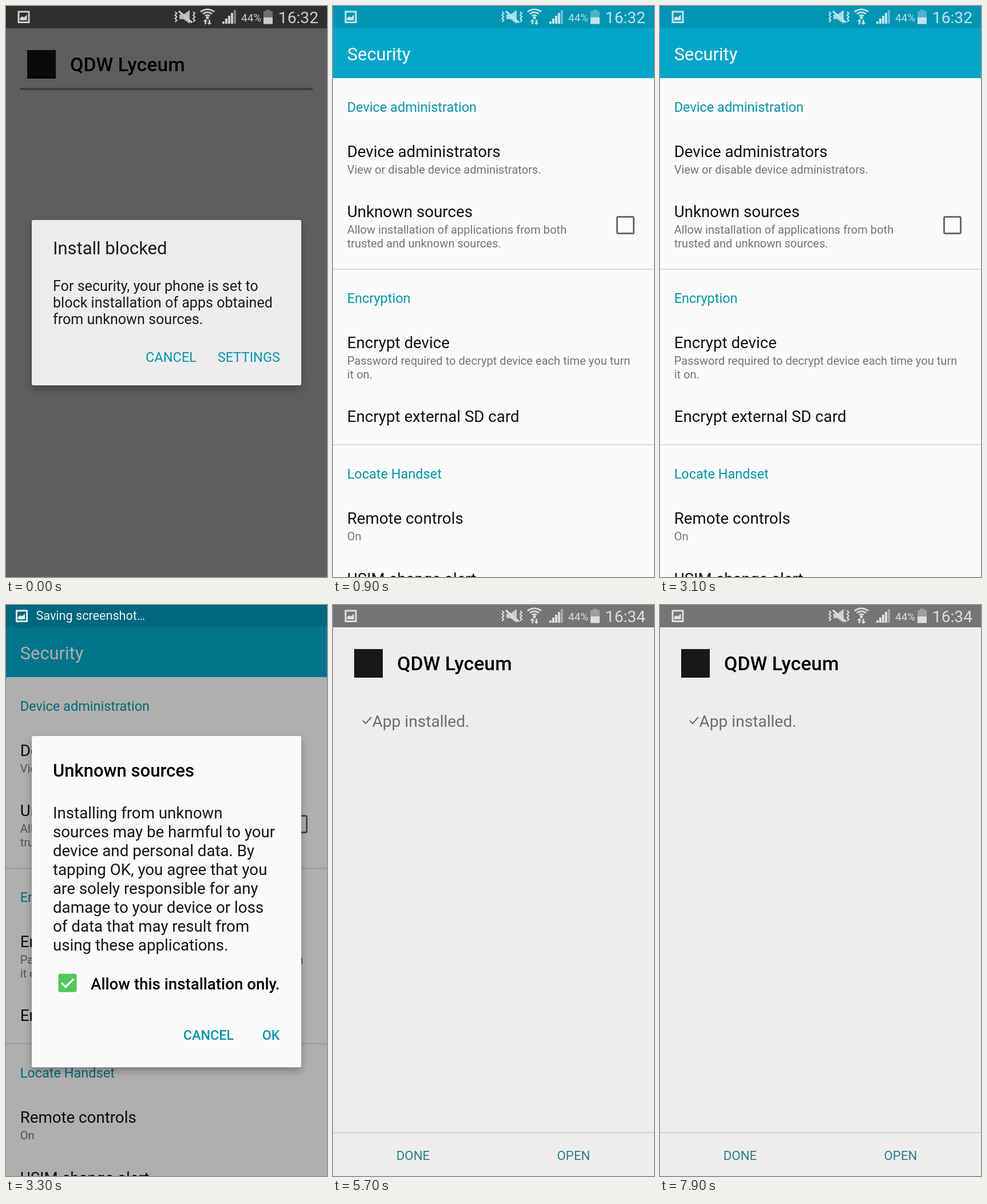
Animation, 561 px wide and 998 px high, one loop 8 s. Source, as an HTML page:

```html
<!DOCTYPE html>
<html lang="en">
<head>
<meta charset="utf-8">
<title>Allowing an app installation</title>
<style>
html, body { margin: 0; width: 100%; height: 100%; overflow: hidden; }
svg { display: block; width: 100%; height: 100%; font-family: Roboto, sans-serif; }
</style>
</head>
<body>
<svg id="stage" viewBox="0 0 561 998" preserveAspectRatio="none"></svg>
<script>
const LOOP = 8000, W = 561, H = 998, TEAL = '#0893aa';
const stage = document.getElementById('stage');

const rect = (x, y, w, h, fill, extra = '') =>
  `<rect x="${x}" y="${y}" width="${w}" height="${h}" fill="${fill}" ${extra}/>`;
const text = (x, y, size, fill, str, extra = '') =>
  `<text x="${x}" y="${y}" font-size="${size}" fill="${fill}" ${extra}>${str}</text>`;
const lines = (x, y, step, size, fill, list) =>
  list.map((s, i) => text(x, y + i * step, size, fill, s)).join('');
const line = (d, stroke, width, extra = '') =>
  `<path d="${d}" fill="none" stroke="${stroke}" stroke-width="${width}" ${extra}/>`;
const group = (id, body, extra = '') => `<g id="${id}" ${extra}>${body}</g>`;
const dim = a => rect(0, 0, W, H, '#000', `opacity="${a}"`);
const MEDIUM = 'font-weight="500"';
const END = 'text-anchor="end"';
const MIDDLE = 'text-anchor="middle"';

const pictureIcon = x =>
  line(`M${x + 1.5} 10h18v18.5h-18z`, '#fff', 3) +
  `<path d="M${x + 4} 25v-4l4-3 3 2 5-5v10z" fill="#fff"/>`;

function statusIcons() {
  const zigzag = x => line(`M${x} 10l3 3-3 3 3 3-3 3 3 3-3 3`, '#fff', 2);
  const arc = r => line(`M${352 - r * .8} ${21 - r * .72}Q352 ${21 - r * 1.3} ${352 + r * .8} ${21 - r * .72}`, '#fff', 2.8);
  const bars = [0, 1, 2, 3, 4].map(i =>
    rect(378 + i * 5, 27 - i * 5, 4, 4 + i * 5, '#fff', i === 4 ? 'opacity=".5"' : '')).join('');
  return pictureIcon(20.5) +
    zigzag(295.5) + zigzag(327) +
    '<path d="M303 15h7l11-8v24l-11-8h-7z" fill="#fff" opacity=".85"/>' +
    line('M302 9l23 20', '#fff', 3) +
    arc(5) + arc(10) + arc(15) +
    '<circle cx="352" cy="20.5" r="2.6" fill="#fff"/>' +
    '<path d="M348.5 23l4 4h-2.7v5h-2.6v-5h-2.7zM355.5 33l4-4h-2.7v-5h-2.6v5h-2.7z" fill="#fff"/>' +
    bars +
    text(411, 26.5, 19, '#fff', '44%') +
    '<path d="M450 20V9h4V6.5h8V9h4v11z" fill="#fff" opacity=".4"/>' +
    rect(450, 20, 16, 11.5, '#fff') +
    text(546, 29.5, 28.2, '#fff', '16:32', `id="clock" ${END}`);
}

const installer =
  rect(0, 0, W, H, '#ededed') + rect(0, 0, W, 39, '#757575') +
  rect(37, 77, 50, 50, '#181818') +
  text(112, 114, 33.9, '#000', 'QDW Lyceum', MEDIUM);

const blocked =
  rect(25, 143, 511, 4, '#a0a0a0') + dim(.6) +
  rect(45, 374, 471, 289, '#ededed', 'rx="3" filter="url(#shadow)"') +
  text(82, 434, 31, '#1c1c1c', 'Install blocked') +
  lines(82, 498, 29.2, 25.1, '#1c1c1c', [
    'For security, your phone is set to',
    'block installation of apps obtained',
    'from unknown sources.']) +
  text(333, 622.4, 23.6, TEAL, 'CANCEL', END) +
  text(479, 622.4, 23.6, TEAL, 'SETTINGS', END);

const installed =
  line('M52 202l5 5 10-11', '#6a6a6a', 2) +
  text(68.5, 213, 28.1, '#6e6e6e', 'App installed.') +
  rect(0, 921.5, W, 1.5, '#c9c9c9') +
  text(140, 969.5, 22.3, '#2f7d8c', 'DONE', MIDDLE) +
  text(420.5, 969.5, 22.3, '#2f7d8c', 'OPEN', MIDDLE);

const header = (y, s) => text(24.7, y, 23.5, TEAL, s);
const item = (y, s) => text(24.7, y, 27.7, '#111', s);
const note = (y, ...s) => lines(24.7, y, 24, 20.1, '#757575', s);

const settings =
  rect(0, 0, W, H, '#fafafa') +
  rect(0, 0, W, 39, '#0095b4') + rect(0, 39, W, 87, '#03a6c8') +
  text(24.7, 94.5, 30.9, '#fafafa', 'Security') +
  header(185.3, 'Device administration') +
  item(264, 'Device administrators') +
  note(293.3, 'View or disable device administrators.') +
  item(369, 'Unknown sources') +
  note(398.2, 'Allow installation of applications from both', 'trusted and unknown sources.') +
  rect(496.5, 368.5, 29, 29, 'none', 'rx="2" stroke="#6a6a6a" stroke-width="3"') +
  rect(0, 459.5, W, 1.5, '#d2d2d2') +
  header(519.3, 'Encryption') +
  item(598, 'Encrypt device') +
  note(627.4, 'Password required to decrypt device each time you turn', 'it on.') +
  item(727, 'Encrypt external SD card') +
  rect(0, 766, W, 1.5, '#d2d2d2') +
  header(826.3, 'Locate Handset') +
  item(905, 'Remote controls') +
  note(934, 'On') +
  item(1011, 'USIM change alert');

const warning =
  dim(.3) +
  group('saving', pictureIcon(17) + text(52.5, 26.3, 21.6, '#fff', 'Saving screenshot…'), 'opacity=".9"') +
  rect(45, 229, 471, 579, '#fafafa', 'rx="3" filter="url(#shadow)"') +
  text(82, 299.5, 31, '#000', 'Unknown sources', MEDIUM) +
  lines(82, 372.5, 33.14, 27.7, '#151515', [
    'Installing from unknown',
    'sources may be harmful to your',
    'device and personal data. By',
    'tapping OK, you agree that you',
    'are solely responsible for any',
    'damage to your device or loss',
    'of data that may result from',
    'using these applications.']) +
  rect(91.5, 644.5, 32, 32, '#52c65a', 'rx="3"') +
  line('M97 660.5l7 7 14.5-14', '#fff', 3.4) +
  text(148, 671.5, 27.7, '#000', 'Allow this installation only.', MEDIUM) +
  text(398, 760.4, 23.3, TEAL, 'CANCEL', `${MEDIUM} ${END}`) +
  text(478.5, 760.4, 23.3, TEAL, 'OK', `${MEDIUM} ${END}`);

stage.innerHTML =
  `<defs><filter id="shadow" x="-10%" y="-10%" width="120%" height="125%">
    <feDropShadow dx="0" dy="6" stdDeviation="7" flood-opacity=".3"/></filter></defs>` +
  group('installer', installer) + group('blocked', blocked) + group('installed', installed) +
  group('settings', settings) + group('warning', warning) +
  group('status', statusIcons(), 'opacity=".76"') +
  '<circle id="touch" r="82.5" fill="#848484" fill-opacity=".44"/>';

const ids = ['installer', 'blocked', 'installed', 'settings', 'warning', 'status', 'touch', 'clock'];
const el = Object.fromEntries(ids.map(id => [id, document.getElementById(id)]));
const show = (id, on) => el[id].setAttribute('display', on ? 'inline' : 'none');

// Each tap: start time and centre; all last 200 ms.
const taps = [[500, 425.5, 613.5], [2900, 473, 383], [5300, 463, 748.5], [7700, 419.5, 952.5]];

function draw(t) {
  const step = [900, 3300, 5700].filter(s => t >= s).length;
  show('installer', step === 0 || step === 3);
  show('blocked', step === 0);
  show('settings', step === 1 || step === 2);
  show('warning', step === 2);
  show('installed', step === 3);
  show('status', step !== 2);
  el.clock.textContent = step === 3 ? '16:34' : '16:32';

  const tap = taps.find(([at]) => t >= at && t < at + 200);
  show('touch', tap);
  if (tap) {
    el.touch.setAttribute('cx', tap[1]);
    el.touch.setAttribute('cy', tap[2]);
  }
}

const start = performance.now();
function tick() {
  draw((performance.now() - start) % LOOP);
  requestAnimationFrame(tick);
}
tick();
</script>
</body>
</html>
```
